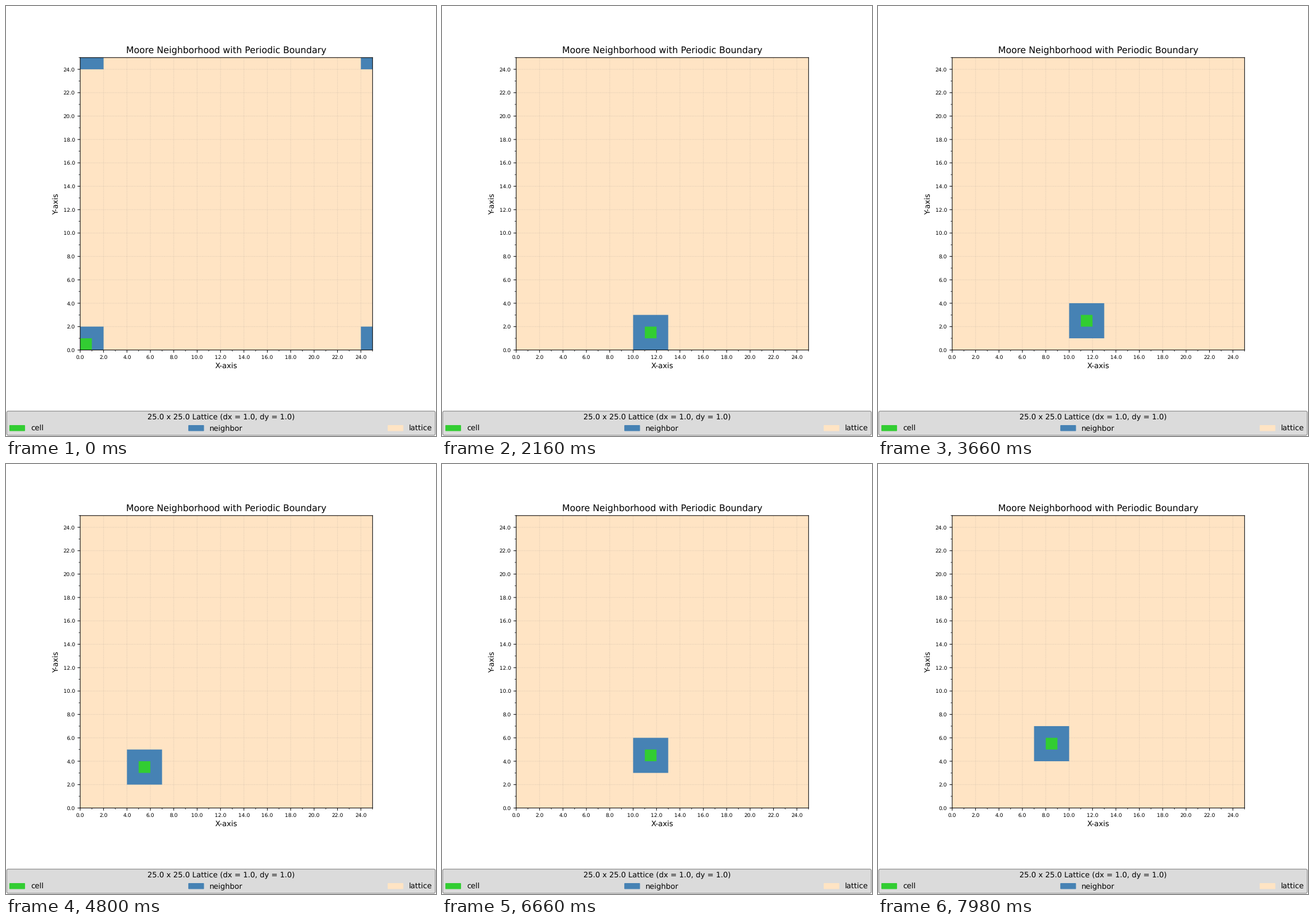
A matplotlib script that plays this animation: 748x748 px, repeating every 8 s.

```python
from itertools import product

import matplotlib.pyplot as plt
from matplotlib.animation import FuncAnimation
from matplotlib.patches import Patch, Rectangle

N = 25             # lattice side
STEP = 20          # ms per drawn frame
HOLD = 60          # ms the active cell stays in place
LOOP = 8000
CELL, NEIGHBOR, LATTICE = "limegreen", "steelblue", "bisque"

INCHES = 8
BOTTOM, TOP = 0.2, 0.88
POINTS_PER_CELL = INCHES * 72 * (TOP - BOTTOM) / N

# Soft, unsnapped lines and unhinted text
plt.rcParams.update({"path.snap": False, "text.hinting": "none"})

fig = plt.figure(figsize=(INCHES, INCHES), dpi=93.5, facecolor="white")
ax = fig.add_subplot()
fig.subplots_adjust(left=0.125, right=0.9, bottom=BOTTOM, top=TOP)
ax.set(xlim=(0, N), ylim=(0, N), aspect="equal", facecolor=LATTICE)
ax.set_xticks([])
ax.set_yticks([])
ax.set_title("Moore Neighborhood with Periodic Boundary", fontsize=12, y=1.0)

major = range(0, N, 2)
minor = range(1, N + 1, 2)


def draw_lines(places, start, end, **style):
    ax.vlines(places, start, end, **style)
    ax.hlines(places, start, end, **style)


def draw_ticks(places, points, width):
    draw_lines(places, -points / POINTS_PER_CELL, 0, colors="black",
               linewidths=width, clip_on=False, zorder=2.1)


draw_lines(major, 0, N, colors="gray", linestyles=":", linewidths=0.8,
           alpha=0.3, zorder=0.5)
draw_ticks(major, 3.5, 0.8)
draw_ticks(minor, 2, 0.6)


def draw_labels(axis_transform, point):
    trans, va, ha = axis_transform(7)
    return [ax.text(*point(v), f"{v:.1f}", transform=trans, va=va, ha=ha, fontsize=7)
            for v in major]


x_labels = draw_labels(ax.get_xaxis_text1_transform, lambda v: (v, 0))
y_labels = draw_labels(ax.get_yaxis_text1_transform, lambda v: (0, v))

# Axis names sit 4 pt outside the tick labels
ax.annotate("X-axis", (0.5, 0), xycoords=("axes fraction", x_labels[0]),
            xytext=(0, -4), textcoords="offset points",
            ha="center", va="top", annotation_clip=False)
ax.annotate("Y-axis", (0, 0.5), xycoords=(y_labels[-1], "axes fraction"),
            xytext=(-4, 0), textcoords="offset points", rotation=90,
            rotation_mode="anchor", ha="center", va="bottom",
            annotation_clip=False)

names = {"cell": CELL, "neighbor": NEIGHBOR, "lattice": LATTICE}
fig.legend(
    handles=[Patch(color=color, label=name) for name, color in names.items()],
    title=f"{N:.1f} x {N:.1f} Lattice (dx = 1.0, dy = 1.0)",
    loc="lower center", mode="expand", ncols=3, borderaxespad=0.1,
    facecolor="lightgray", edgecolor="gray", framealpha=0.8)


def add_square(side, color, zorder):
    return ax.add_patch(Rectangle((0, 0), side, side, fc=color, lw=0, zorder=zorder))


# One block per periodic image of the lattice; the axes clip the rest
shifts = list(product((-N, 0, N), repeat=2))
blocks = [add_square(3, NEIGHBOR, 1) for _ in shifts]
cell = add_square(1, CELL, 1.1)


def update(i):
    row, col = divmod(i * STEP // HOLD, N)
    cell.set_xy((col, row))
    for block, (dx, dy) in zip(blocks, shifts):
        block.set_xy((col - 1 + dx, row - 1 + dy))
    return [*blocks, cell]


ani = FuncAnimation(fig, update, frames=LOOP // STEP, interval=STEP,
                    repeat=True, repeat_delay=0)
plt.show()
```
